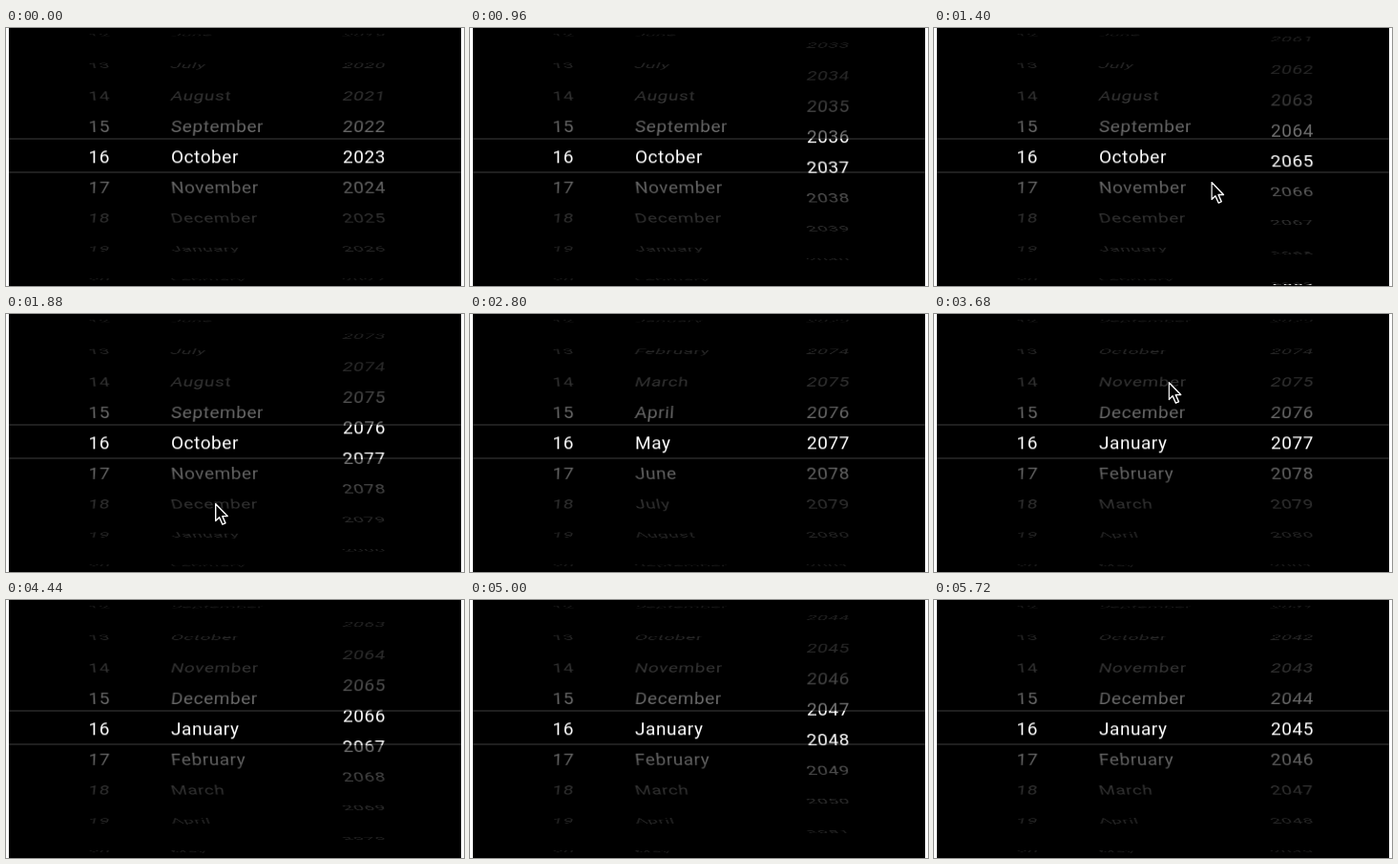
Write an HTML page that moves like this. It is 480 px wide and 270 px high and loops after 6.44 s.

```html
<!DOCTYPE html>
<html lang="en">
<head>
<meta charset="utf-8">
<title>Date wheel</title>
<style>
  html, body { margin: 0; width: 100%; height: 100%; overflow: hidden; background: #000; }
  #stage { position: absolute; left: 0; top: 0; width: 480px; height: 270px; overflow: hidden; background: #000; }
  #stage > * { position: absolute; }
  .wheel { top: 0; width: 190px; height: 270px; color: #fff; font: 19px/32px Roboto, sans-serif; letter-spacing: .55px; }
  .row { position: absolute; left: 0; top: -16px; width: 100%; height: 32px; white-space: nowrap; }
  .days { width: 106px; text-align: right; }
  .shade { left: 0; top: 0; width: 480px; height: 116px;
    background: linear-gradient(rgba(0,0,0,.9), rgba(0,0,0,.81) 72px, rgba(0,0,0,.52)); }
  .lower { top: 152px; transform: scaleY(-1); }
  .line { left: 3px; width: 474px; height: 2px; background: rgba(255,255,255,.12); }
  .edge { top: 0; width: 3px; height: 270px; background: #fff; }
  #cursor { left: 0; top: 0; }
</style>
</head>
<body>
<div id="stage">
  <div class="wheel days" style="left:3px"></div>
  <div class="wheel" style="left:172.5px"></div>
  <div class="wheel" style="left:352.6px"></div>
  <div class="shade"></div>
  <div class="shade lower"></div>
  <div class="line" style="top:115px"></div>
  <div class="line" style="top:150px"></div>
  <div class="edge" style="left:0"></div>
  <div class="edge" style="left:477px"></div>
  <svg id="cursor" width="20" height="28">
    <path d="M.7 .7V18.5L4.6 14.8L7.9 22.2L11 20.8L7.8 13.6H13.2Z" fill="#000" stroke="#fff" stroke-width="1.4" stroke-linejoin="round"/>
  </svg>
</div>
<script>
const LOOP = 6440, TICK = 40, PITCH = 32, MIDDLE = 135.3, REACH = 5;
const MONTHS = ["January", "February", "March", "April", "May", "June", "July",
  "August", "September", "October", "November", "December"];

const progress = (t, start, end) => Math.min(1, Math.max(0, (t - start) / (end - start)));
const easeOut = (u, power) => 1 - (1 - u) ** power;

// A flick gathers speed quickly, then coasts to rest
const flick = (t, start, end, rows) =>
  rows * easeOut(progress(t, start, end) ** 1.41, 3.5);

const yearAt = t => 2023 + flick(t, 720, 2160, 54) + flick(t, 4160, 5515, -32);
const monthAt = t => 9 + flick(t, 2120, 2760, 7) + flick(t, 2800, 3640, 8);

// The pointer shows only while it travels from one wheel to the next
const trips = [
  { start: 80, end: 720, hide: 720, from: [173, 135], to: [399, 232], power: 1 },
  { start: 1240, end: 1880, hide: 2080, from: [388, 110], to: [219, 198], power: 3 },
  { start: 3560, end: 4040, hide: 4040, from: [200, 79], to: [382, 47], power: 1 }
];

const wheels = [...document.querySelectorAll(".wheel")].map(box =>
  Array.from({ length: 2 * REACH + 1 }, () => {
    const row = document.createElement("div");
    row.className = "row";
    box.append(row);
    return row;
  }));

// Tilt follows the whole-step distance, position follows the exact value
function turn(rows, value, label) {
  const base = Math.floor(value + 1e-6), shift = value - base;
  rows.forEach((row, i) => {
    const d = i - REACH;
    const tilt = -Math.sign(d) * Math.min(22 * Math.abs(d), 79);
    row.textContent = label(base + d);
    row.style.transform =
      `translateY(${MIDDLE + PITCH * (d - shift)}px) perspective(330px) rotateX(${tilt}deg)`;
  });
}

const cursor = document.getElementById("cursor");

function movePointer(t) {
  const trip = trips.find(p => t >= p.start && t <= p.hide);
  cursor.style.display = trip ? "block" : "none";
  if (!trip) return;
  const u = easeOut(progress(t, trip.start, trip.end), trip.power);
  const [x, y] = trip.from.map((a, i) => a + (trip.to[i] - a) * u);
  cursor.style.transform = `translate(${x}px, ${y}px)`;
}

function draw(t) {
  turn(wheels[0], 16, String);
  turn(wheels[1], monthAt(t), n => MONTHS[(n + 12) % 12]);
  turn(wheels[2], yearAt(t), String);
  movePointer(t);
}

const begin = performance.now();
function loop() {
  const t = (performance.now() - begin) % LOOP;
  draw(Math.floor(t / TICK) * TICK);
  requestAnimationFrame(loop);
}
loop();
</script>
</body>
</html>
```
